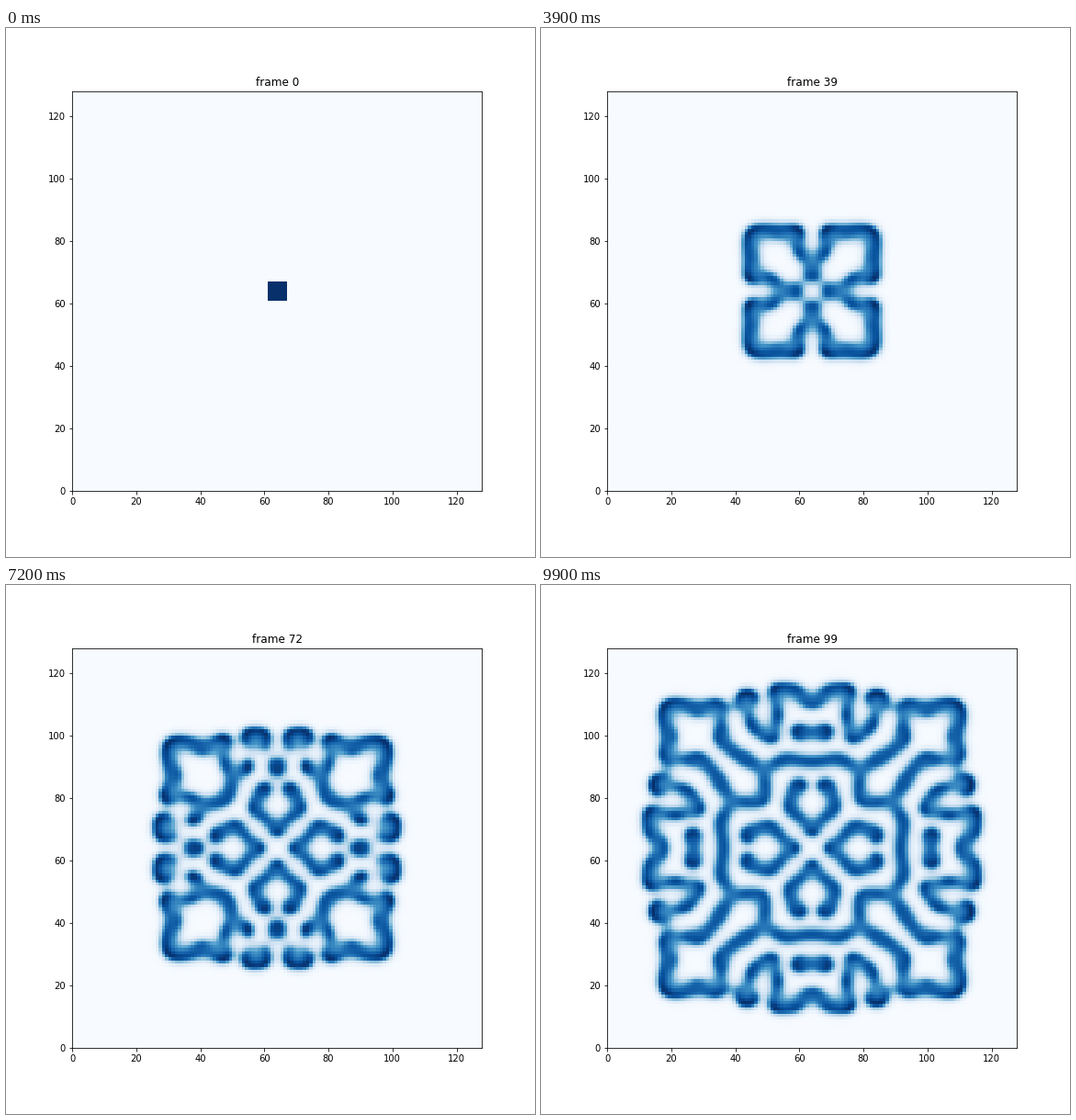
Animation, 576 px wide and 576 px high, one loop 10000 ms. Source, as a matplotlib script:

```python
import numpy as np
import matplotlib.pyplot as plt
from matplotlib.animation import FuncAnimation

# Gray-Scott reaction-diffusion, grown from a small square seed
SIZE = 128
FRAMES = 100
STEPS = 200
DT = 0.2
FEED, KILL = 0.04, 0.06075
DIFFUSION = np.array([0.1, 0.05]).reshape(2, 1, 1)


def seed():
    """One quadrant of (u, v): row/column 0 is a mirror, the last one a fixed edge."""
    half = SIZE // 2
    state = np.zeros((2, half + 1, half + 1))
    state[0, 1:7, 1:7] = 0.9
    state[1, 1:4, 1:4] = 0.7
    return state


def step(s):
    s[:, 0] = s[:, 1]
    s[:, :, 0] = s[:, :, 1]
    c = s[:, 1:-1, 1:-1]
    change = s[:, :-2, 1:-1] + s[:, 2:, 1:-1]
    change += s[:, 1:-1, :-2]
    change += s[:, 1:-1, 2:]
    change -= 4 * c
    change *= DIFFUSION
    u, v = c
    reaction = u * v * v
    change[0] += FEED * (1 - u) - reaction
    change[1] += reaction - (FEED + KILL) * v
    change *= DT
    c += change


def unfold(quadrant):
    right = np.hstack([quadrant[:, ::-1], quadrant])
    return np.vstack([right[::-1], right])


def simulate():
    state = seed()
    history = []
    for n in range(FRAMES):
        history.append(unfold(state[1, 1:, 1:]))
        if n < FRAMES - 1:
            for _ in range(STEPS):
                step(state)
    return history


history = simulate()

fig, ax = plt.subplots(figsize=(8, 8), dpi=72)
fig.subplots_adjust(left=0.125, right=0.9, bottom=0.125, top=0.88)
mesh = ax.pcolormesh(history[0], cmap="Blues")
title = ax.set_title("frame 0")


def update(n):
    mesh.set_array(history[n])
    mesh.autoscale()
    title.set_text(f"frame {n}")
    return mesh, title


anim = FuncAnimation(fig, update, frames=FRAMES, interval=100, repeat=True)
plt.show()
```
